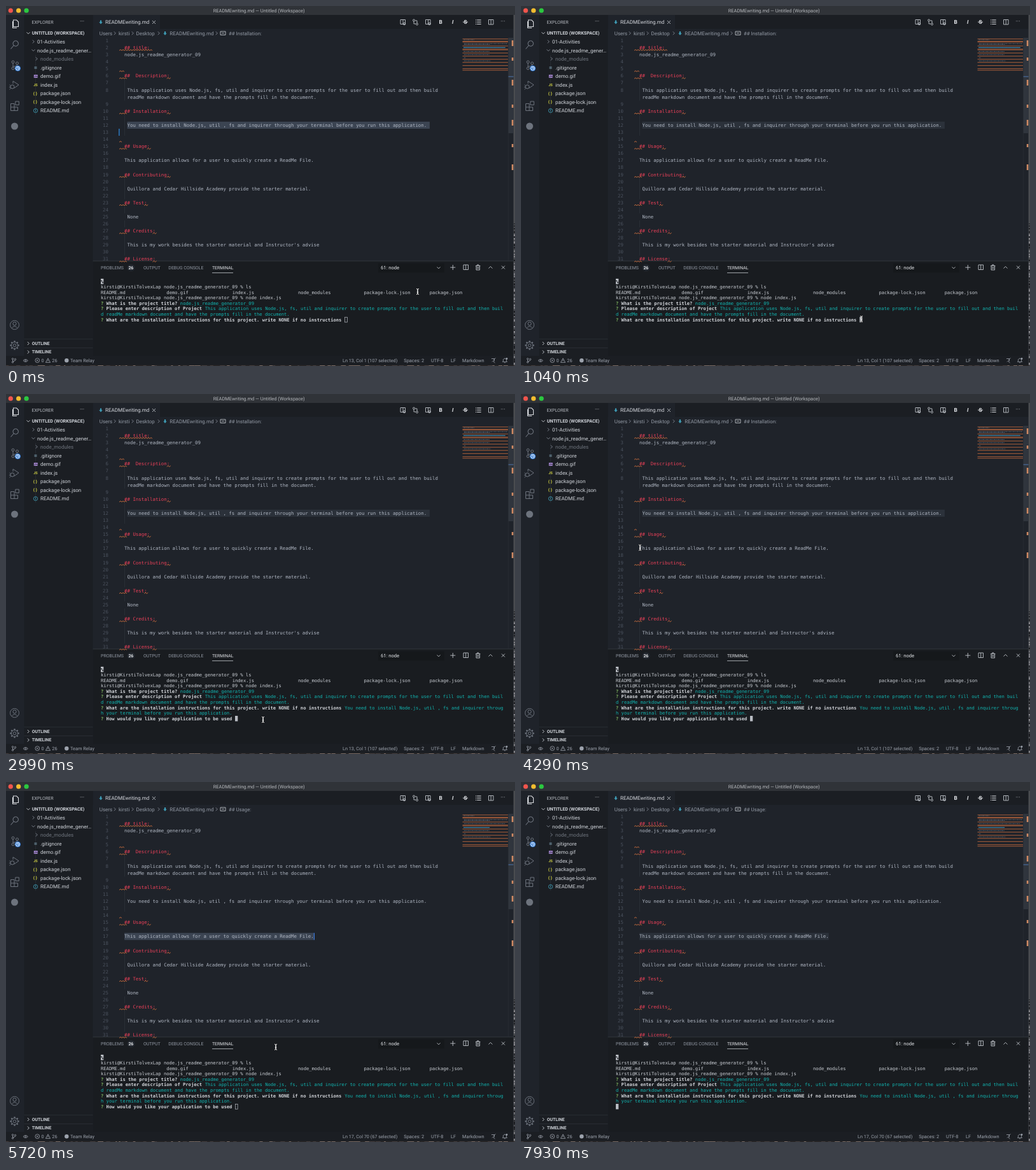
An HTML page for the animation above (8 s loop, 800 by 566 pixels).

```html
<!DOCTYPE html>
<html lang="en">
<head>
<meta charset="utf-8">
<title>Editor and terminal</title>
<style>
html, body { margin: 0; width: 100%; height: 100%; overflow: hidden; background: #1f2329; }
svg { display: block; width: 100%; height: 100%; }
text { white-space: pre; text-rendering: geometricPrecision; font-family: Roboto, sans-serif; }
.m { font-family: "DejaVu Sans Mono", monospace; }
</style>
</head>
<body>
<svg id="stage" viewBox="0 0 800 566"></svg>
<script>
const CODE = 7.38, CW = 4.443, CX = 177.2, ROW = 11.08;   // editor grid
const TERM = 7.15, TW = 4.306, TX = 149, TROW = 8.58;     // terminal grid
const INK = '#b0b7c3', DIM = '#868c97', RED = '#ea4059', CYAN = '#12b4b0',
      GREEN = '#7fb45f', ORANGE = '#d0703f', TEAL = '#3f9cb5', WHITE = '#e4e6ea';

const rect = (x, y, w, h, fill, more = '') =>
  `<rect x="${x}" y="${y}" width="${w}" height="${h}" fill="${fill}" ${more}/>`;
const dot = (x, y, r, fill) => `<circle cx="${x}" cy="${y}" r="${r}" fill="${fill}"/>`;
const line = (d, color = DIM, w = 0.9, more = '') =>
  `<path d="${d}" fill="none" stroke="${color}" stroke-width="${w}" ${more}/>`;
const ring = (x, y, r) => `M${x - r} ${y}a${r} ${r} 0 1 0 ${2 * r} 0a${r} ${r} 0 1 0 ${-2 * r} 0`;
// y is the middle of the capitals
const text = (x, y, s, size = 8, fill = INK, more = '') =>
  `<text x="${x}" y="${y + size * 0.355}" font-size="${size}" fill="${fill}" ${more}>${s}</text>`;
const bold = (x, y, s, size, fill) => text(x, y, s, size, fill, 'font-weight="700"');
const chevron = (x, y, down, c = DIM) =>
  line(down ? `M${x - 2.5} ${y - 1.2}l2.5 2.5l2.5 -2.5` : `M${x - 1.2} ${y - 2.5}l2.5 2.5l-2.5 2.5`, c);
const arrow = (x, y) =>
  `<path d="M${x - 1.1} ${y - 3}h2.2v2.8h1.7l-2.8 3.2l-2.8 -3.2h1.7z" fill="${TEAL}"/>`;

const rowY = r => 54.4 + r * ROW;
const lineRow = n => n > 8 ? n : n - 1;                   // line 8 wraps
const code = (row, col, s, fill = INK) =>
  text(CX + col * CW, rowY(row), s, CODE, fill, 'class="m"');
const wave = (x, end, y) => {
  let d = `M${x} ${y}`;
  for (let up = 1; x < end; x += 2, up = -up) d += `l2 ${-1.6 * up}`;
  return line(d, ORANGE, 0.9);
};
const mapY = r => 50 + r * 1.23;                          // minimap rows

const termY = r => 433 + r * TROW;
const term = (row, col, s, fill = '#c9cdd3', strong) =>
  text(TX + col * TW, termY(row), s, TERM, fill, `class="m" font-weight="${strong ? 700 : 400}"`);
const question = (row, s) => term(row, 0, '?', GREEN, true) + term(row, 2, s, '#d0d3d8', true);

let seed = 7;
const rnd = () => (seed = seed * 16807 % 2147483647) / 2147483647;

const INSTALL = 'You need to install Node.js, util , fs and inquirer through your terminal before you run this application.';
const USAGE = 'This application allows for a user to quickly create a ReadMe File.';
const ABOUT = 'This application uses Node.js, fs, util and inquirer to create prompts for the user to fill out and then build ';
const ABOUT2 = 'readMe markdown document and have the prompts fill in the document.';
const PROMPT = 'kirsti@KirstiTolvexLap node.js_readme_generator_09 % ';

// body text: row, column, words
const BODY = [[2, 2, 'node.js_readme_generator_09'], [7, 3, ABOUT], [8, 3, ABOUT2], [12, 3, INSTALL], [17, 2, USAGE],
  [21, 3, 'Quillora and Cedar Hillside Academy provide the starter material.'], [25, 3, 'None'],
  [29, 3, "This is my work besides the starter material and Instructor's advise"]];

function frameParts() {
  let s = rect(0, 0, 800, 566, '#1f232a') + rect(0, 0, 800, 14, '#303338');
  ['#f2554d', '#f5bd2f', '#2bc840'].forEach((c, i) => s += dot(7.3 + i * 12.4, 7.2, 3.6, c));
  s += text(325.7, 7.2, 'READMEwriting.md — Untitled (Workspace)', 7.47, '#b4b7bb');
  s += rect(28.5, 14, 108, 536, '#1b1e23') + rect(136.5, 14, 661, 22, '#1b1e23')
    + rect(137, 14, 105, 22, '#1f232a') + rect(136.5, 401, 661, 149, '#191c20')
    + rect(136.5, 400.6, 661, 0.7, '#3a3f47') + rect(0, 550, 800, 15, '#1b1e23');
  return s;
}

function activityBar() {
  const c = '#6d737d';
  let s = line('M10.5 24V34.5H17M11.5 22h5l3 3v7.5h-8z', '#d8dade', 1.1)
    + line(ring(15.2, 59, 4.2) + 'M12.2 62l-4.7 5.5', c, 1.1)
    + line(ring(11, 88, 2) + ring(17.5, 90, 2) + ring(11, 98, 2) + 'M11 90v6M17.5 92q0 3 -6 3', c, 1)
    + dot(18.5, 98, 4.6, '#2f78d2') + line(ring(18.5, 98, 2.9) + 'M18.5 96.3v1.9h1.5', '#fff', 1)
    + line('M11 122v-4l9 6l-7 5' + ring(10, 127, 3) + 'M5.5 124l2 1.5M5.5 131l2 -1.5M5 127.5h2', c, 1)
    + line('M7.5 153.5h5.5v11h-5.5zM7.5 159h11v5.5h-5.5M14.8 150h5.5v5.5h-5.5z', c, 1)
    + dot(13.5, 189, 5.5, c)
    + line(ring(13.5, 501.5, 7) + ring(13.5, 499.5, 2.6) + 'M9 506.5q4.5 -6 9 0', c, 1)
    + line(ring(13.5, 533.5, 2.2) + ring(13.5, 533.5, 5), c, 1);
  for (let i = 0; i < 8; i++)
    s += `<g transform="rotate(${i * 45} 13.5 533.5)">${rect(12.4, 526.3, 2.2, 2.2, c)}</g>`;
  return s;
}

function sidebar() {
  const c = '#d0d4da';
  let s = text(40.5, 25, 'EXPLORER', 7.1, '#b4b8bf') + text(116, 23.5, '···', 9, c)
    + chevron(35, 42.5, true, c) + bold(40.7, 42.5, 'UNTITLED (WORKSPACE)', 7.2, c)
    + chevron(43, 56, false) + text(49, 56.2, '01-Activities', 8, c)
    + chevron(43, 69.5, true) + text(49, 69.8, 'node.js_readme_gener…', 8, c)
    + rect(46, 77, 0.6, 94, '#30353c')
    + chevron(48, 83, false) + text(54, 83.4, 'node_modules', 8, '#6f757e');
  ['.gitignore', 'demo.gif', 'index.js', 'package.json', 'package-lock.json', 'README.md']
    .forEach((name, i) => s += text(54, 97 + i * 13.5, name, 8, c));
  s += rect(44.5, 95, 4, 4, '#4d5f6b')
    + rect(43.8, 108, 6, 5, '#9b7fc4') + line('M45 112l1.6 -2.3l1 1.2l0.8 -0.8l1 2', '#1b1e23', 0.7)
    + bold(43.2, 124.2, 'JS', 5.6, '#cbcb41')
    + bold(42.8, 137.3, '{ }', 6.8, '#cbcb41') + bold(42.8, 150.8, '{ }', 6.8, '#cbcb41')
    + line(ring(46.5, 164.5, 3.1), TEAL) + bold(45.7, 164.5, 'i', 5.4, TEAL);
  [['OUTLINE', 530.5], ['TIMELINE', 544]].forEach(([name, y]) =>
    s += rect(28.5, y - 7, 108, 0.6, '#33383f') + chevron(35, y, false, c) + bold(40.7, y, name, 6.9, c));
  return s;
}

function editorBar() {
  const c = '#c0c4ca';
  let s = arrow(149, 25.5) + text(156, 25.4, 'READMEwriting.md', 8, '#d7dae0')
    + line('M230 23l5 5m0 -5l-5 5', c);
  [620, 659.5].forEach(x => s += line(`M${x} 21.5h7.5v7h-7.5zM${x + 4} 21.5v7`, c)
    + line(ring(x + 6, 28, 1.8), c));
  s += line(ring(641, 22.5, 1.5) + ring(646, 28.5, 1.5) + 'M641 24v4h3M646 27v-4h-3', c)
    + bold(680.5, 25.2, 'B', 8.4, WHITE)
    + text(701, 25.2, 'I', 8.4, WHITE, 'font-weight="700" font-style="italic"')
    + bold(719.5, 25.2, 'S', 8.4, WHITE) + line('M718 25.2h8', WHITE)
    + line('M738 22h1.2m1 0h6.5M738 25.2h1.2m1 0h6.5M738 28.4h1.2m1 0h6.5', WHITE, 1)
    + line('M758.5 21.5h7.5v7.5h-7.5zM762.2 21.5v7.5', c) + text(777.5, 23.8, '···', 9, c);
  [[146.7, 'Users'], [177, 'kirsti'], [204.5, 'Desktop'], [257.3, 'READMEwriting.md']]
    .forEach(([x, name]) => s += text(x, 42.8, name, 8, '#9299a4'));
  [171, 199, 240, 331].forEach(x => s += chevron(x, 42.8, false));
  return s + arrow(250, 43) + line('M337 40h8v5.5h-8zM339 42.7h4', c);
}

function documentText() {
  let s = '';
  for (let n = 1; n < 32; n++)
    s += text(161, rowY(lineRow(n)), n, CODE, '#4b525e', 'class="m" text-anchor="end"');
  [[6, 8], [11, 13], [20, 22], [24, 24], [26, 26], [28, 30]].forEach(([a, b]) =>
    s += rect(186.2, rowY(a) - 5.5, 0.5, (b - a + 1) * ROW, '#343a43'));
  const heads = [[2, 'title:'], [6, ' Description:'], [10, 'Installation:'], [15, 'Usage:'],
    [19, 'Contributing:'], [23, 'Test:'], [27, 'Credits:'], [31, 'License:']];
  heads.forEach(([n, name]) => {
    const r = lineRow(n), y = rowY(r) + 4.6, end = CX + (name.length + 5) * CW;
    s += code(r, 2, '## ' + name, RED);
    s += n === 2 ? wave(178, 230, y) : wave(178, 189, y) + wave(end - 4.4, end, y);
  });
  BODY.forEach(([row, col, words]) => s += code(row, col, words));
  return s + wave(178, 185, rowY(4) + 4.6) + wave(178, 182, rowY(14) + 4.6);
}

function minimap() {
  let s = rect(789, 50, 0.6, 350, '#2b3037') + rect(789.6, 50, 7.6, 150, '#30353d');
  BODY.forEach(([row, col, words]) =>
    s += line(`M${718 + col * 0.6} ${mapY(row) + 0.6}h${words.length * 0.615}`, '#7c838e', 0.8,
      'stroke-dasharray="3 .7 1.5 .7" opacity=".75"'));
  [1, 4, 5, 10, 14, 15, 19, 23, 27, 31, 35, 39, 41].forEach(r =>
    s += rect(717.5, mapY(r), 71.5, 1.1, ORANGE, 'opacity=".7"'));
  [54, 81, 116, 155, 179, 217, 249].forEach((y, i) => s += rect(794.8, y, 2.8, i % 2 ? 5 : 9, '#d08a63'));
  return s;
}

function desktopEdge() {
  let s = rect(797.6, 14, 2.4, 552, '#4a4c50') + rect(0, 564.6, 800, 1.4, '#2a2727');
  for (let y = 342; y < 562; y += 2 + rnd() * 4)
    s += rect(798, y, 2, 1 + rnd() * 2.5, rnd() < 0.5 ? '#85858a' : '#1d1e22');
  for (let x = 0; x < 800; x += 4 + rnd() * 12)
    s += rect(x, 565, 2 + rnd() * 7, 1, rnd() < 0.5 ? '#7a6c66' : '#453f40');
  return s;
}

function panel() {
  const c = '#c0c4ca';
  let s = '';
  [[149, 'PROBLEMS'], [216, 'OUTPUT'], [255.3, 'DEBUG CONSOLE']].forEach(([x, name]) =>
    s += text(x, 411.8, name, 7, '#9299a4'));
  s += text(324, 411.8, 'TERMINAL', 6.9, WHITE) + rect(324, 419.2, 33, 0.8, '#c0c4ca')
    + rect(190.5, 406.3, 12, 10.6, '#23282f', 'rx="5.3"') + bold(192.4, 411.7, '26', 6.9, WHITE)
    + rect(585, 404.5, 104, 14.5, '#15181b') + text(589, 411.8, '61: node', 7.6, WHITE)
    + chevron(680, 411.5, true, c)
    + line('M698.3 411h8M702.3 407v8', c) + line('M719 407h7.5v7.5h-7.5zM722.7 407v7.5', c)
    + line('M738 408.5h7.5M739 408.5v6.5h5.5v-6.5M740.5 408v-1.2h2.5v1.2M740.8 410v3.5M742.7 410v3.5', c)
    + line('M758.5 412.5l3 -3l3 3', c) + line('M779 408.5l5 5m0 -5l-5 5', c);

  s += rect(TX, 428.8, TW, 8.4, '#c3c7cd') + term(0, 0, '%', '#191c20', true)
    + term(1, 0, PROMPT + 'ls') + term(3, 0, PROMPT + 'node index.js');
  ['README.md', 'demo.gif', 'index.js', 'node_modules', 'package-lock.json', 'package.json']
    .forEach((name, i) => s += term(2, i * 24, name));
  return s + question(4, 'What is the project title?') + term(4, 29, 'node.js_readme_generator_09', CYAN)
    + question(5, 'Please enter description of Project') + term(5, 38, ABOUT.slice(0, 109), CYAN)
    + term(6, 0, ABOUT.slice(109) + ABOUT2, CYAN)
    + question(7, 'What are the installation instructions for this project. write NONE if no instructions');
}

function statusBar() {
  const c = '#9da3ad';
  let s = line(ring(10.5, 554.8, 1.2) + ring(10.5, 560, 1.2) + ring(14.5, 555.5, 1.2) + 'M10.5 556v3M14.5 556.8q0 1.5 -3.5 2', c, 0.8)
    + line('M27 557.5q3.7 -4 7.4 0q-3.7 4 -7.4 0' + ring(30.7, 557.5, 1), c, 0.8)
    + line(ring(49.3, 557.2, 3.4) + 'M48 556l2.6 2.6m0 -2.6l-2.6 2.6', c, 0.8)
    + line('M66 553.8l3.6 6.6h-7.2zM66 556v2.4', c, 0.8) + dot(95.3, 557.2, 3.2, c)
    + line('M763 554.5h4.5v3.5h-2l-1.5 1.5M766 556.5l3.5 -3M766 559l2.5 2', c, 0.8)
    + line('M780.5 559.5h7l-1 -1.5v-2.2q-2.5 -3.5 -5 0v2.2zM783.2 560.8h1.6', c, 0.8) + dot(787, 554.5, 1.4, c);
  [[55.5, '0'], [72.3, '26'], [101, 'Team Relay'], [625.3, 'Spaces: 2'], [668, 'UTF-8'], [699, 'LF'], [717, 'Markdown']]
    .forEach(([x, name]) => s += text(x, 557.3, name, 7.4, c));
  return s;
}

const stage = document.getElementById('stage');
stage.innerHTML = frameParts() + '<g id="under"></g>' + activityBar() + sidebar() + editorBar()
  + documentText() + minimap() + panel() + statusBar() + desktopEdge() + '<g id="over"></g>';
const under = document.getElementById('under'), over = document.getElementById('over');

// pointer path: step, x, y
const PATH = [[0, 647, 449], [1, 640, 452], [5, 545, 488], [6, 535, 492], [13, 535, 492],
  [14, 588, 400], [15, 420, 250], [16, 228, 194], [18, 300, 300], [19, 330, 430], [20, 382, 520],
  [21, 404, 512], [25, 404, 512], [27, 370, 440], [30, 215, 270], [32, 187, 241], [34, 187, 242],
  [35, 262, 244], [36, 400, 246], [37, 491, 247], [40, 492, 250], [43, 450, 370], [46, 372, 510], [61, 372, 510]];

function pointer(k) {
  if ((k > 8 && k < 13) || k > 47) return '';
  const i = PATH.findIndex(p => p[0] > k), [ka, xa, ya] = PATH[i - 1], [kb, xb, yb] = PATH[i];
  const f = (k - ka) / (kb - ka), x = xa + (xb - xa) * f, y = ya + (yb - ya) * f;
  const d = `M${x - 2} ${y - 4.5}q2 0 2 1.5v6q0 1.5 -2 1.5M${x + 2} ${y - 4.5}q-2 0 -2 1.5v6q0 1.5 2 1.5M${x - 1.2} ${y + 1}h2.4`;
  return line(d, '#111', 2) + line(d, '#f4f4f4', 1);
}

function draw(k) {
  const usage = k >= 34, focus = k < 6 || (usage && k < 46);
  const picked = usage ? [0, 17, 48, 67][Math.min(k - 34, 3)] : 107;
  const row = usage ? 17 : 12, x = CX + (usage ? 2 : 3) * CW;
  under.innerHTML = rect(x, rowY(row) - 5.5, picked * CW, ROW, focus ? '#3b4452' : '#2b313a');

  let s = text(350, 42.8, usage ? '## Usage:' : '## Installation:', 7.8, '#9299a4')
    + text(529, 557.3, usage ? `Ln 17, Col ${picked + 3} (${picked} selected)` : 'Ln 13, Col 1 (107 selected)', 7.3, '#9da3ad')
    + rect(719, mapY(row), picked * 0.615, 1.2, '#3f86a8')
    + rect(789.6, usage ? 129.5 : 110.5, 8, 1, '#4f78b0');
  if (focus) s += usage ? rect(x + picked * CW, rowY(17) - 5.5, 1.2, ROW, '#3d7be0')
    : rect(177.2, rowY(13) - 5.5, 1.3, ROW, '#2f86d6');

  let cursor = [7, 89];
  if (k >= 9) {
    s += term(7, 89, INSTALL.slice(0, 58), CYAN) + term(8, 0, INSTALL.slice(58), CYAN);
    cursor = [8, 48];
  }
  if (k >= 10) {
    const asked = k < 61;
    if (asked) s += question(9, 'How would you like your application to be used');
    cursor = [9, asked ? 49 : 0];
  }
  if (k >= 49 && k < 58) s += term(10, 0, '>>', RED) + term(10, 3, 'Please enter valid information');
  const cx = TX + cursor[1] * TW, cy = termY(cursor[0]) - 4.2;
  s += focus ? rect(cx + 0.4, cy + 0.4, TW - 0.6, 7.8, 'none', 'stroke="#b9bdc4" stroke-width=".7"')
    : rect(cx, cy, TW, 8.5, '#b9bdc4');
  over.innerHTML = s + pointer(k);
}

let shown = -1;
function tick(now) {
  const k = Math.floor(now % 8000 / 130);
  if (k !== shown) draw(shown = k);
  requestAnimationFrame(tick);
}
tick(performance.now());
</script>
</body>
</html>
```
